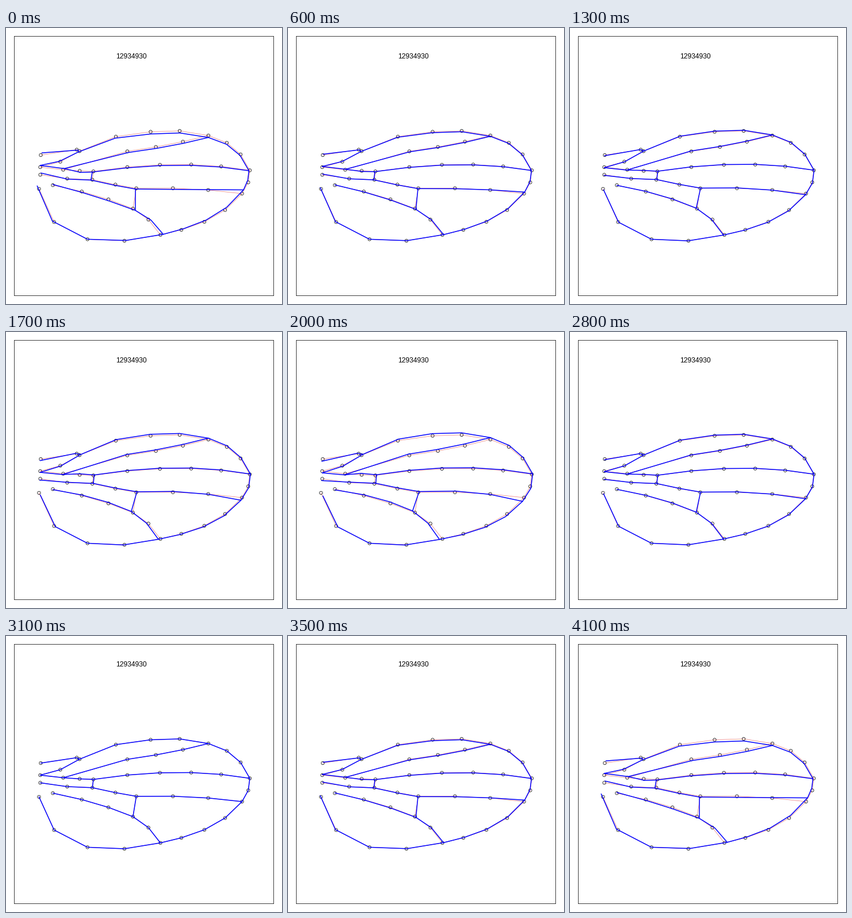
A matplotlib script for the animation above (4200 ms loop, 480 px wide and 480 px high).

```python
import numpy as np
import matplotlib.pyplot as plt
from matplotlib.animation import FuncAnimation

SIZE = 480
STEPS = 21

# Vein junctions: mean x, y and their shift at the start of the swing.
JOINTS = dict(
    a=(60.5, 221, 1.8, -3.8), b=(123, 211.6, 2.5, 0.7),
    c=(128, 214.2, -2.4, 1.5), d=(59.5, 242, 0, -3),
    e=(352, 187, 0, 3.4), f=(424, 247.5, -1.5, 0.7),
    g=(410.5, 288, 2.6, -6.5), h=(268.5, 359.8, 5, -1),
    i=(57.4, 279.8, -3.2, -5.2), j=(99.5, 246.5, 1.6, -2),
    k=(152, 249.4, -2, 1.1), l=(150.2, 263.8, -2.5, 0.7),
    m=(59.6, 255.3, 1.2, -3.1), n=(226.6, 278.8, -1.5, 1.3),
    o=(81.5, 273.3, 0, -1.2), p=(220.8, 314.2, 4.2, 3),
    q=(141.7, 367.4, 0, 0), r=(251.5, 180.5, 0.3, 3.8),
    t=(345, 337, 3, -2.9), u=(211, 214.5, 2, 2),
)

# Curved spans: inner points, then the pull on the middle (and its shift).
ARCS = dict(
    dc=(1, 0.7, 4.4), cr=(1, 1.3, -8.4), re=(1, 0.3, -4.8),
    ef=(2, 9, -8.4), fg=(1, 4.1, 0.7, -1.5, -0.6), gt=(1, 3.3, 4),
    th=(1, -1.8, 2.6), hq=(1, 0.9, 6.4), qi=(1, -15.9, 13.8, -1.4, 1),
    ue=(2, 3, 1.7), jk=(1, 2.4, 0.5, 1.6, 3.1), kf=(4, 7.2, -11.2, 1.8, 0.5),
    ml=(1, 1.5, 2.4, 0.6, 2), ln=(1, 1.9, 1.1), ng=(2, 2.7, -3.6, -0.6, 3.7),
    op=(2, 4.3, -2.8, -2, 1.2), ph=(1, 3, -3.8),
)

VEINS = ["dcrefgthqi", "abc", "djue", "jkf", "mlng", "oph", "kl", "np"]


def span(start, end):
    """Evenly stepped parabola between two joints, without its end."""
    count, *pull = ARCS.get(start + end, (0, 0, 0))
    pull = np.array(pull + [0] * (4 - len(pull)))
    s = np.linspace(0, 1, count + 2)[:-1, None]
    p, q = np.array(JOINTS[start]), np.array(JOINTS[end])
    return p + (q - p) * s + 4 * s * (1 - s) * pull


def trace(path):
    spans = [span(*pair) for pair in zip(path, path[1:])]
    return np.vstack(spans + [JOINTS[path[-1]]])


veins = [trace(path) for path in VEINS]
marks = np.unique(np.vstack(veins), axis=0)

fig = plt.figure(figsize=(SIZE / 72, SIZE / 72), dpi=72, facecolor="white")
ax = fig.add_axes([0, 0, 1, 1])
ax.set(xlim=(0, SIZE), ylim=(SIZE, 0))
ax.axis("off")

ax.add_patch(plt.Rectangle((14.4, 14.4), 451.2, 451.2, fill=False,
                           ec="black", lw=0.75, snap=False))
ax.text(191, 53, "12934930", family="Liberation Sans", size=12,
        va="baseline", color="black")


def draw(vein, **style):
    line, = ax.plot(vein[:, 0], vein[:, 1], solid_capstyle="round",
                    solid_joinstyle="round", snap=False, **style)
    return line


for vein in veins:
    draw(vein, color="lightcoral", lw=0.75, zorder=2)
ax.scatter(marks[:, 0], marks[:, 1], s=5.4 ** 2, facecolors="none",
           edgecolors="black", linewidths=0.75, zorder=3, snap=False)
lines = [draw(vein, color="blue", lw=1.5, zorder=4) for vein in veins]


def update(i):
    step = min(i, 2 * STEPS - 1 - i)
    swing = 1 - 2 * step / (STEPS - 1)
    for line, vein in zip(lines, veins):
        line.set_data(*(vein[:, :2] + swing * vein[:, 2:]).T)
    return lines


anim = FuncAnimation(fig, update, frames=2 * STEPS, interval=100,
                     repeat=True, repeat_delay=0, blit=False)
plt.show()
```
